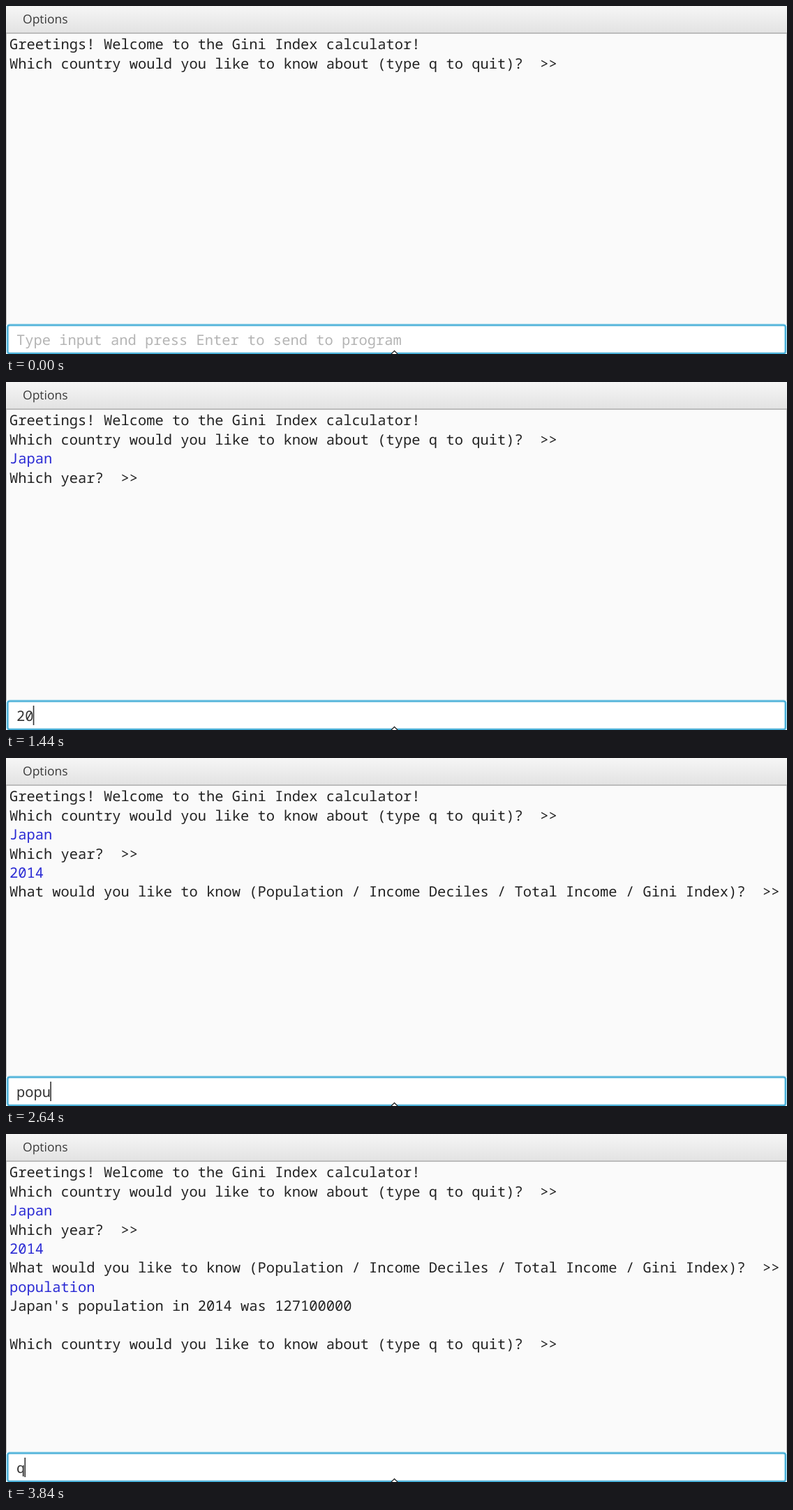
Animation of 1119x500 px, one loop 4000 ms. Source, as an HTML page:

```html
<!DOCTYPE html>
<html lang="en">
<head>
<meta charset="utf-8">
<title>Gini Index calculator</title>
<style>
html, body { margin: 0; width: 100%; height: 100%; overflow: hidden; background: #fafafa; }
svg { display: block; width: 1119px; height: 500px; }
text { white-space: pre; text-rendering: geometricPrecision; }
.mono { font: 20.45px "Noto Sans Mono", "DejaVu Sans Mono", monospace; fill: #222; }
.mono .typed { fill: #2a2ad4; }
.menu { font: 17.5px "Open Sans", "Noto Sans", sans-serif; fill: #3a3a3a; }
</style>
</head>
<body>
<svg viewBox="0 0 1119 500">
  <defs>
    <linearGradient id="bar" x1="0" y1="0" x2="0" y2="1">
      <stop offset="0" stop-color="#f6f6f6"/>
      <stop offset="1" stop-color="#e2e2e2"/>
    </linearGradient>
  </defs>
  <rect width="1119" height="500" fill="#fafafa"/>
  <rect width="1119" height="39" fill="url(#bar)"/>
  <rect y="38" width="1119" height="2" fill="#bcbcbc"/>
  <path d="M.5 40V458M1118.5 40V458" stroke="#c4c4c4"/>
  <text class="menu" x="24" y="25.4">Options</text>
  <g id="log" class="mono"></g>
  <rect x="2.3" y="458.4" width="1114.6" height="40.8" rx="3" fill="#fff" stroke="#c4e6f2" stroke-width="4.4"/>
  <rect x="2.3" y="458.4" width="1114.6" height="40.8" rx="3" fill="none" stroke="#3fabd6" stroke-width="2"/>
  <text id="field" class="mono" x="15" y="486.6"></text>
  <rect id="caret" y="465" width="1.6" height="28" fill="#333"/>
  <path d="M551 501L556.5 495.5L562 501" fill="#fff" stroke="#222" stroke-width="1.3"/>
</svg>
<script>
const LOOP = 4000, ADVANCE = 12.27, LINE = 27.45;
const HINT = "Type input and press Enter to send to program";
const ASK = "Which country would you like to know about (type q to quit)?  >>";

// Output lines, each with the time it appears; the third item marks user input.
const lines = [
  [0, "Greetings! Welcome to the Gini Index calculator!"],
  [0, ASK],
  [960, "Japan", true],
  [960, "Which year?  >>"],
  [1840, "2014", true],
  [1840, "What would you like to know (Population / Income Deciles / Total Income / Gini Index)?  >>"],
  [3440, "population", true],
  [3440, "Japan's population in 2014 was 127100000"],
  [3440, ""],
  [3440, ASK]
];

// Each entry: word, key press times, time of Enter.
const entries = [
  ["Japan", [160, 400, 480, 560, 720], 960],
  ["2014", [1360, 1440, 1600, 1760], 1840],
  ["population", [2080, 2240, 2400, 2640, 2880, 2960, 3040, 3120, 3120, 3200], 3440],
  ["q", [3760], LOOP]
];

const log = document.getElementById("log");
const field = document.getElementById("field");
const caret = document.getElementById("caret");

const rows = lines.map(([at, str, typed], i) => {
  const row = document.createElementNS("http://www.w3.org/2000/svg", "text");
  row.setAttribute("x", 5);
  row.setAttribute("y", 62.2 + i * LINE);
  if (typed) row.setAttribute("class", "typed");
  row.textContent = str;
  log.append(row);
  return { row, at };
});

function draw(t) {
  for (const { row, at } of rows) row.style.display = t >= at ? "" : "none";
  const [word, keys] = entries.find(e => t < e[2]);
  const count = keys.filter(k => k <= t).length;
  field.textContent = count ? word.slice(0, count) : HINT;
  field.style.fill = count ? "#333" : "#b4b4b4";
  caret.setAttribute("x", 14.2 + count * ADVANCE);
  caret.style.display = t < 160 ? "none" : "";
}

const start = performance.now();
function tick() {
  draw((performance.now() - start) % LOOP);
  requestAnimationFrame(tick);
}
tick();
</script>
</body>
</html>
```
